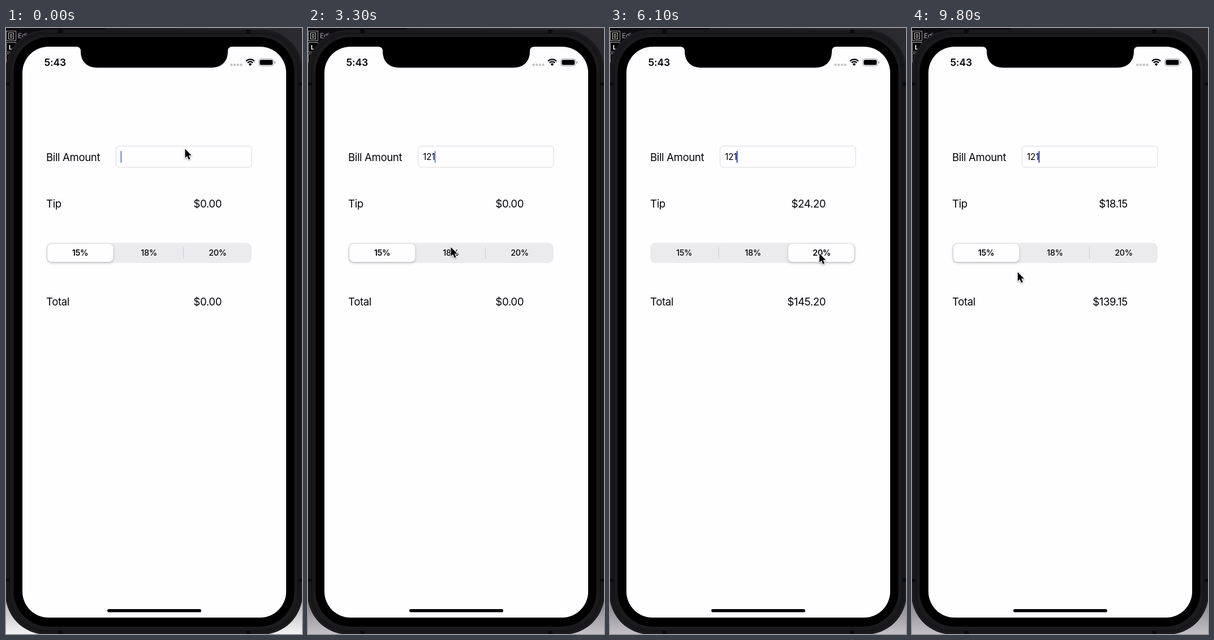
These frames come from a looping animation (523 px wide and 1070 px high, 10000 ms). An HTML page with a canvas:

```html
<!DOCTYPE html>
<html lang="en">
<head>
<meta charset="utf-8">
<title>Tip calculator</title>
<style>
  html, body { margin: 0; width: 100%; height: 100%; overflow: hidden; background: #000; }
  canvas { display: block; width: 523px; height: 1070px; }
</style>
</head>
<body>
<canvas id="stage" width="523" height="1070"></canvas>
<script>
const ctx = document.getElementById('stage').getContext('2d');
const LOOP = 10000, STEP = 100;
const FONT = 'Inter, "Liberation Sans", sans-serif';
const INK = '#050507', SCREEN = '#fefdff';

// Tracks: rows of [time, value, ...]
const pointerTrack = [
  [0, 316.5, 213.5], [100, 315.6, 219], [200, 315.2, 223.6], [3000, 315.2, 223.6],
  [3300, 252.5, 387], [4600, 252.5, 387], [5100, 369.5, 402.5], [5200, 369.5, 402.5],
  [5500, 370, 398], [6200, 370, 398], [6800, 219, 392.5], [6900, 225.8, 392.5],
  [7400, 225.8, 392.5], [7800, 149.6, 392.5], [9000, 149.6, 392.5], [9600, 186.8, 431]
];
const thumbTrack = [
  [0, 0], [3500, 0], [4000, 1], [5700, 1], [6200, 2],
  [7300, 2], [7700, 1], [8100, 1], [8500, 0]
];
const popupTrack = [[0, 0], [800, 0], [1100, 1], [1700, 1], [2000, 0]];
const caretIntro = [[0, .7], [100, .3], [200, 0], [500, 0], [700, 1], [1100, 1], [1300, 0], [1500, 0], [1700, 1]];
const caretBlink = [[0, 1], [200, 1], [300, .65], [400, 0], [600, 0], [700, .5], [800, 1]];
const typedSteps = [[0, ''], [1800, '1'], [2400, '12'], [2800, '121']];
const rateSteps = [[0, 0], [3500, .18], [5700, .2], [7300, .18], [8100, .15]];
const pressSteps = [[0, -1], [3400, 1], [3600, -1], [5500, 2], [5800, -1], [7200, 1], [7400, -1], [8000, 0], [8200, -1]];

const clamp = v => Math.max(0, Math.min(1, v));
const ease = p => p * p * (3 - 2 * p);

function tween(track, t, curve = p => p) {
  const i = track.findLastIndex(row => row[0] <= t);
  const a = track[i], b = track[i + 1] || a;
  const p = a === b ? 0 : curve((t - a[0]) / (b[0] - a[0]));
  return a.slice(1).map((v, k) => v + (b[k + 1] - v) * p);
}

const stepAt = (steps, t) => steps.findLast(row => row[0] <= t)[1];

function box(x, y, w, h, r, fill, stroke) {
  ctx.beginPath();
  ctx.roundRect(x, y, w, h, r);
  if (fill) { ctx.fillStyle = fill; ctx.fill(); }
  if (stroke) { ctx.strokeStyle = stroke; ctx.lineWidth = 1; ctx.stroke(); }
}

function text(str, x, y, size, { weight = 400, align = 'left', color = INK, tracking = -.02 } = {}) {
  ctx.font = `${weight} ${size}px ${FONT}`;
  ctx.letterSpacing = `${size * tracking}px`;
  ctx.textAlign = align;
  ctx.fillStyle = color;
  ctx.fillText(str, x, y);
  return ctx.measureText(str).width;
}

function withAlpha(alpha, draw) {
  ctx.save();
  ctx.globalAlpha = alpha;
  draw();
  ctx.restore();
}

function shadow(color, blur, dy) {
  ctx.shadowColor = color;
  ctx.shadowBlur = blur;
  ctx.shadowOffsetY = dy;
}

function drawBackdrop(focused) {
  const top = ctx.createLinearGradient(0, 0, 523, 0);
  top.addColorStop(0, '#0e0c11');
  top.addColorStop(.33, '#0e0c11');
  top.addColorStop(.34, '#1d1c20');
  top.addColorStop(1, '#2c2b2f');
  ctx.fillStyle = top;
  ctx.fillRect(0, 0, 523, 1000);
  const floor = ctx.createLinearGradient(0, 1000, 0, 1070);
  floor.addColorStop(0, focused ? '#77757a' : '#aaa8ac');
  floor.addColorStop(1, focused ? '#c4c2c7' : '#f3f2f4');
  ctx.fillStyle = floor;
  ctx.fillRect(0, 1000, 523, 70);

  for (const y of [5.5, 25.5, 45.5]) box(.5, y, 17, 17, 0, '#000', '#a9a7ab');
  box(4.5, 8.5, 9, 11, 0, null, '#d5d3d7');
  box(7.5, 11.5, 3, 5, 0, null, '#d5d3d7');
  text('L', 5, 38, 11, { weight: 700, color: '#fff' });
  text('Edi', 21, 18, 12, { color: '#aaa8ac' });
}

function drawPhone() {
  box(-1, 3, 525, 1068, 72, '#18171a');
  box(.5, 4.5, 522, 1065, 71, null, '#242327');
  box(7, 10, 509, 1054, 66, '#1b1a1d', '#121114');
  ctx.fillStyle = '#0b0a0d';
  for (const y of [96, 972]) {
    ctx.fillRect(0, y, 7, 6);
    ctx.fillRect(516, y, 7, 6);
  }
  for (const x of [92, 424]) {
    ctx.fillRect(x, 3, 8, 7);
    ctx.fillRect(x, 1064, 8, 6);
  }
  box(13.5, 16, 496, 1041, 62, '#000');
  box(29, 33, 466, 1008, 46, SCREEN);

  ctx.fillStyle = '#000';
  ctx.beginPath();
  ctx.moveTo(124, 32);
  ctx.lineTo(124, 33);
  ctx.quadraticCurveTo(132, 33, 132, 41);
  ctx.bezierCurveTo(132, 59, 143, 70, 161, 70);
  ctx.lineTo(363, 70);
  ctx.bezierCurveTo(381, 70, 392, 59, 392, 41);
  ctx.quadraticCurveTo(392, 33, 400, 33);
  ctx.lineTo(400, 32);
  ctx.fill();
  box(179, 1026, 166, 5.6, 2.8, '#000');
}

function drawStatusBar() {
  text('5:43', 67.5, 67, 17.5, { weight: 600, tracking: -.01 });
  for (let i = 0; i < 4; i++) box(396.2 + i * 5.7, 62.8, 4.4, 4.4, 2.2, '#c4c3c7');

  ctx.strokeStyle = '#000';
  ctx.lineWidth = 2.3;
  for (const r of [6.6, 10.6]) {
    ctx.beginPath();
    ctx.arc(431.5, 66, r, -Math.PI * .75, -Math.PI * .25);
    ctx.stroke();
  }
  ctx.fillStyle = '#000';
  ctx.beginPath();
  ctx.moveTo(431.5, 67);
  ctx.arc(431.5, 66.5, 4, -Math.PI * .75, -Math.PI * .25);
  ctx.fill();

  box(446.5, 54.5, 26.5, 12.5, 3.8, null, '#9a999d');
  box(448.3, 56.3, 23, 9, 2.3, '#000');
  box(474.3, 58.7, 1.6, 4.2, .8, '#9a999d');
}

function drawField(t) {
  text('Bill Amount', 71, 235, 18.6);
  box(194.5, 208.5, 239.5, 37.5, 5.5, SCREEN, '#d9d8dd');
  const typed = stepAt(typedSteps, t);
  const width = typed ? text(typed, 203, 233, 15.5) : 0;
  const caret = t < 1700 ? tween(caretIntro, t)
    : t < 2800 ? [1] : tween(caretBlink, t % 1000);
  withAlpha(caret[0], () => box(202.3 + width, 217, 2.2, 21, 1, '#3454d1'));
}

function drawAmounts(t) {
  const rate = stepAt(rateSteps, t);
  const tip = 121 * rate, total = rate ? 121 + tip : 0;
  const rows = [['Tip', tip, 317], ['Total', total, 490]];
  for (const [label, value, y] of rows) {
    text(label, 71, y, 18.6);
    text('$' + value.toFixed(2), 381, y, 18.6, { align: 'right' });
  }
}

function drawSegments(t) {
  const [pos] = tween(thumbTrack, t, p => 1 - (1 - p) ** 3);
  const pressed = stepAt(pressSteps, t);
  box(71, 379.3, 363, 35.7, 9.5, '#ebeaec');
  withAlpha(clamp(pos - 1), () => box(191.5, 387, 1, 20.5, 0, '#cac9cd'));
  withAlpha(clamp(1 - pos), () => box(313, 387, 1, 20.5, 0, '#cac9cd'));
  ctx.save();
  shadow('rgba(0,0,0,.2)', 5, 2);
  box(73.2 + pos * 121.4, 381.3, 116, 31.7, 7.5, SCREEN);
  ctx.restore();
  ['15%', '18%', '20%'].forEach((label, i) => {
    const weight = Math.round(pos) === i ? 600 : 500;
    withAlpha(pressed === i ? .5 : 1, () =>
      text(label, 131 + i * 121.5, 402.4, 14.4, { weight, align: 'center' }));
  });
}

function drawPopup(t) {
  withAlpha(tween(popupTrack, t)[0], () => {
    box(164, 155, 79, 42, 8.5, '#000');
    ctx.beginPath();
    ctx.moveTo(192.5, 196.5);
    ctx.lineTo(203.3, 207);
    ctx.lineTo(214, 196.5);
    ctx.fill();
    text('Paste', 203.5, 182, 15.6, { align: 'center', color: '#fff' });
  });
}

function drawPointer(t) {
  const [x, y] = tween(pointerTrack, t, ease);
  const arrow = new Path2D('M0 0V16L3.6 12.6L6.2 18.8L9 17.6L6.4 11.6H11.2Z');
  ctx.save();
  ctx.translate(x, y);
  ctx.lineJoin = 'round';
  ctx.lineWidth = 2;
  ctx.strokeStyle = '#fff';
  shadow('rgba(0,0,0,.35)', 3, 1.2);
  ctx.stroke(arrow);
  shadow('transparent', 0, 0);
  ctx.fillStyle = '#000';
  ctx.fill(arrow);
  ctx.restore();
}

const start = performance.now();

function frame() {
  const t = Math.floor(((performance.now() - start) % LOOP) / STEP) * STEP;
  ctx.clearRect(0, 0, 523, 1070);
  drawBackdrop(t >= 600);
  drawPhone();
  drawStatusBar();
  drawField(t);
  drawAmounts(t);
  drawSegments(t);
  drawPopup(t);
  drawPointer(t);
  requestAnimationFrame(frame);
}
frame();
</script>
</body>
</html>
```
